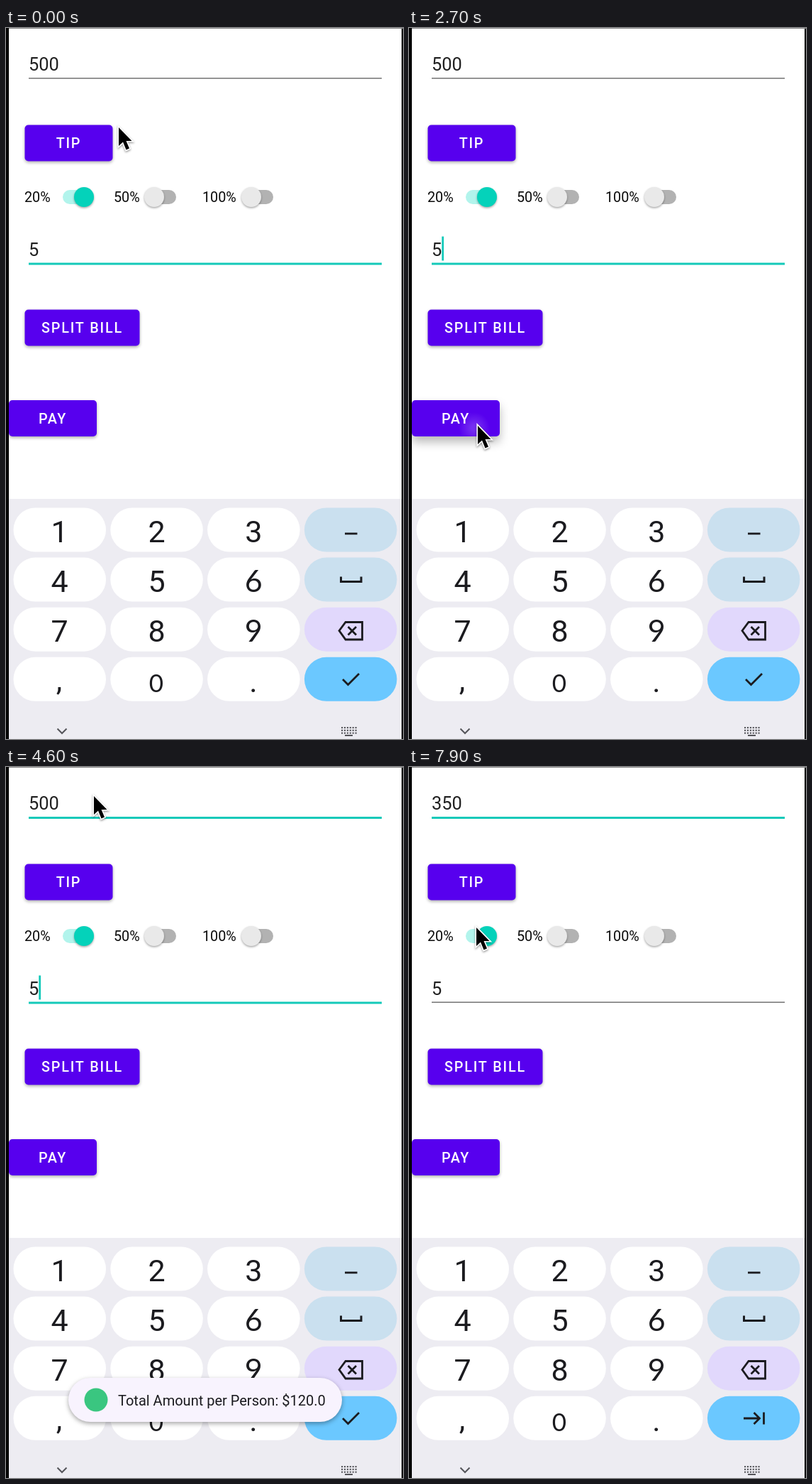
An HTML page with a canvas for the animation above (8000 ms loop, 560 by 1001 pixels).

```html
<!DOCTYPE html>
<html lang="en">
<head>
<meta charset="utf-8">
<title>Bill splitter</title>
<style>
html, body { margin: 0; width: 100%; height: 100%; overflow: hidden; background: #fff; }
canvas { display: block; width: 100vw; height: 100vh; }
</style>
</head>
<body>
<canvas id="stage"></canvas>
<script>
const W = 560, H = 1001, LOOP = 8000, STEP = 100;
const TEAL = '#14c9b9', PURPLE = '#5700ee', INK = '#1b1b1f';
const canvas = document.getElementById('stage');
const ctx = canvas.getContext('2d');
const dpr = window.devicePixelRatio || 1;
canvas.width = W * dpr;
canvas.height = H * dpr;

// Pointer tip positions: time, x, y
const route = [
  [0, 159, 140], [500, 140, 92], [900, 112, 48], [1100, 99, 29],
  [1400, 95, 77], [1800, 95, 140], [2200, 96, 390], [2500, 97, 560],
  [2900, 97, 560], [3300, 160, 455], [3700, 197, 374], [4200, 150, 160],
  [4500, 126, 50], [4600, 124, 41], [7600, 124, 41], [7900, 95, 226], [8000, 95, 226]
];

// First field: time, text
const edits = [[0, '500'], [5600, '50'], [5800, '5'], [6000, ''], [6700, '3'], [6800, '35'], [7000, '350']];

const clamp = v => Math.max(0, Math.min(1, v));
const ramp = (t, a, b) => clamp((t - a) / (b - a));

function pointerAt(t) {
  const i = Math.max(1, route.findIndex(p => p[0] > t));
  const [t0, x0, y0] = route[i - 1], [t1, x1, y1] = route[i];
  const k = ramp(t, t0, t1);
  return [x0 + (x1 - x0) * k, y0 + (y1 - y0) * k];
}

function rect(x, y, w, h, color) {
  ctx.fillStyle = color;
  ctx.fillRect(x, y, w, h);
}

function round(x, y, w, h, r, color) {
  ctx.fillStyle = color;
  ctx.beginPath();
  ctx.roundRect(x, y, w, h, r);
  ctx.fill();
}

function disc(x, y, r, color) {
  ctx.fillStyle = color;
  ctx.beginPath();
  ctx.arc(x, y, r, 0, Math.PI * 2);
  ctx.fill();
}

function text(s, x, y, font, color, align = 'left', spacing = 0) {
  ctx.font = font;
  ctx.fillStyle = color;
  ctx.textAlign = align;
  ctx.letterSpacing = spacing + 'px';
  ctx.fillText(s, x, y);
}

function stroke(d, width, color = INK) {
  ctx.lineWidth = width;
  ctx.strokeStyle = color;
  ctx.stroke(new Path2D(d));
}

function shadowed(alpha, blur, dy, draw) {
  ctx.save();
  ctx.shadowColor = `rgba(0,0,0,${alpha})`;
  ctx.shadowBlur = blur * dpr;
  ctx.shadowOffsetY = dy * dpr;
  draw();
  ctx.restore();
}

function button(label, x, y, w, lift = 0) {
  shadowed(0.32 - 0.04 * lift, 4 + 10 * lift, 2 + 6 * lift, () => round(x, y, w, 51, 5, PURPLE));
  text(label, x + w / 2, y + 32.5, '500 19.8px Roboto, sans-serif', '#fff', 'center', 1.77);
}

function toggle(label, x, thumb, on) {
  text(label, x, 245, '19.8px Roboto, sans-serif', '#0a0a0a');
  round(on ? thumb - 30 : thumb - 13, 228, 44, 20, 10, on ? '#b2f4ec' : '#b2b2b2');
  shadowed(0.35, 3, 1.5, () => disc(thumb, 238, 14, on ? '#04d2ba' : '#e9e9e9'));
}

function field(value, y, active, caret) {
  const font = '25.4px Roboto, sans-serif';
  text(value, 32, y, font, '#212121');
  rect(32, y + 10, 498, active ? 3 : 1.5, active ? TEAL : '#737373');
  if (caret) {
    ctx.font = font;
    rect(32 + ctx.measureText(value).width, y - 27, 2.8, 34, TEAL);
  }
}

function caretHandle(x, y) {
  ctx.save();
  ctx.translate(x, y);
  ctx.rotate(Math.PI / 4);
  round(-14, -14, 28, 28, [0, 14, 14, 14], '#35d7c4');
  ctx.restore();
}

function keyboard(nextIcon) {
  rect(4, 663, 554, 338, '#edecf2');
  const side = ['#cae0ef', '#cae0ef', '#e1d8fc', '#6bc8ff'];
  for (let row = 0; row < 4; row++) {
    const y = 675.5 + row * 70.1;
    for (let col = 0; col < 4; col++) {
      const x = 10.5 + col * 136.8;
      round(x, y, 130.5, 62, 31, col < 3 ? '#fff' : side[row]);
      if (col < 3 && row < 3) {
        const n = row * 3 + col + 1;
        const face = n === 6 || n === 9 ? 'Lato' : 'Roboto';
        text(n, x + 65.2, 724 + row * 70.2, `43px ${face}, sans-serif`, INK, 'center');
      }
    }
  }
  text(',', 75, 933, '43px Roboto, sans-serif', INK, 'center');
  text('0', 212, 934.5, '35px Lato, sans-serif', INK, 'center');
  text('.', 349, 934.5, '43px Roboto, sans-serif', INK, 'center');

  rect(478, 710.5, 17.5, 2.8, INK);
  stroke('M472.5 772.5V779.5H501V772.5', 3);
  stroke('M470 848.5L479 836.5H502.5V861H479ZM482.5 843L494 854.5M494 843L482.5 854.5', 2.8);
  stroke(nextIcon
    ? 'M472 917H494M486.5 909L494.5 917L486.5 925M500.5 908.5V925.5'
    : 'M475 917L482.5 924.5L498 909', 2.8);

  stroke('M72.5 986.5L79 993L85.5 986.5', 2, '#55555a');
  for (let i = 0; i < 18; i++) {
    rect(473 + (i % 6) * 3.9, 984 + Math.floor(i / 6) * 3.8, 2.1, 2.1, '#55555a');
  }
  rect(478, 995, 11, 2, '#55555a');
}

function toast(alpha) {
  if (alpha <= 0) return;
  ctx.save();
  ctx.globalAlpha = alpha;
  shadowed(0.35, 6, 2.5, () => round(88, 860, 386, 62, 31, '#f8f3fe'));
  disc(127, 891, 16.5, '#3ac680');
  text('Total Amount per Person: $120.0', 158, 898.5, '20px Roboto, sans-serif', INK);
  ctx.restore();
}

function ripple(x, y, alpha) {
  if (alpha <= 0) return;
  ctx.save();
  ctx.beginPath();
  ctx.roundRect(4, 524, 124, 51, 5);
  ctx.clip();
  const glow = ctx.createRadialGradient(x, y, 4, x, y, 22);
  glow.addColorStop(0, `rgba(255,255,255,${alpha})`);
  glow.addColorStop(1, 'rgba(255,255,255,0)');
  rect(x - 24, y - 24, 48, 48, glow);
  ctx.restore();
}

function pointer(x, y) {
  ctx.save();
  ctx.translate(x, y);
  const arrow = new Path2D('M0 0V26L6 20.5L10.5 31.5L15 29.5L10.5 19H18.5Z');
  ctx.lineWidth = 3.2;
  ctx.strokeStyle = '#fff';
  shadowed(0.4, 3, 1.5, () => ctx.stroke(arrow));
  ctx.fillStyle = '#000';
  ctx.fill(arrow);
  ctx.restore();
}

function caretOn(t) {
  // Every edit restarts the blink
  const starts = [4700, ...edits.slice(1).map(e => e[0])].filter(s => s <= t);
  return (t - starts[starts.length - 1]) % 1000 < 500;
}

function draw(t) {
  ctx.setTransform(dpr, 0, 0, dpr, 0, 0);
  rect(0, 0, W, H, '#000');
  rect(4, 0, 554, H, '#fff');
  rect(0, 0, W, 1, '#8a8a8a');

  const amount = edits.filter(e => e[0] <= t).pop()[1];
  const second = t < 4700;
  field(amount, 60, t >= 4600, !second && caretOn(t));
  field('5', 320.5, second, second && t % 1000 >= 500);

  const lift = ramp(t, 2500, 2700) * (1 - ramp(t, 2800, 3000));
  button('TIP', 26.5, 136.5, 124);
  button('SPLIT BILL', 26.5, 396.5, 162);
  button('PAY', 4, 524, 124, lift);
  ripple(92, 563, 0.18 * lift);

  toggle('20%', 26, 110, true);
  toggle('50%', 152, 209, false);
  toggle('100%', 277, 346, false);

  rect(0, 0, 4, H, '#000');
  if (t >= 4700 && t < 5700) caretHandle(76, 87);
  keyboard(t >= 4800);
  toast(ramp(t, 2800, 3100) * (1 - ramp(t, 4900, 5300)));
  pointer(...pointerAt(t));
}

const start = performance.now();
function tick() {
  const t = (performance.now() - start) % LOOP;
  draw(Math.floor(t / STEP) * STEP);
  requestAnimationFrame(tick);
}
tick();
</script>
</body>
</html>
```
